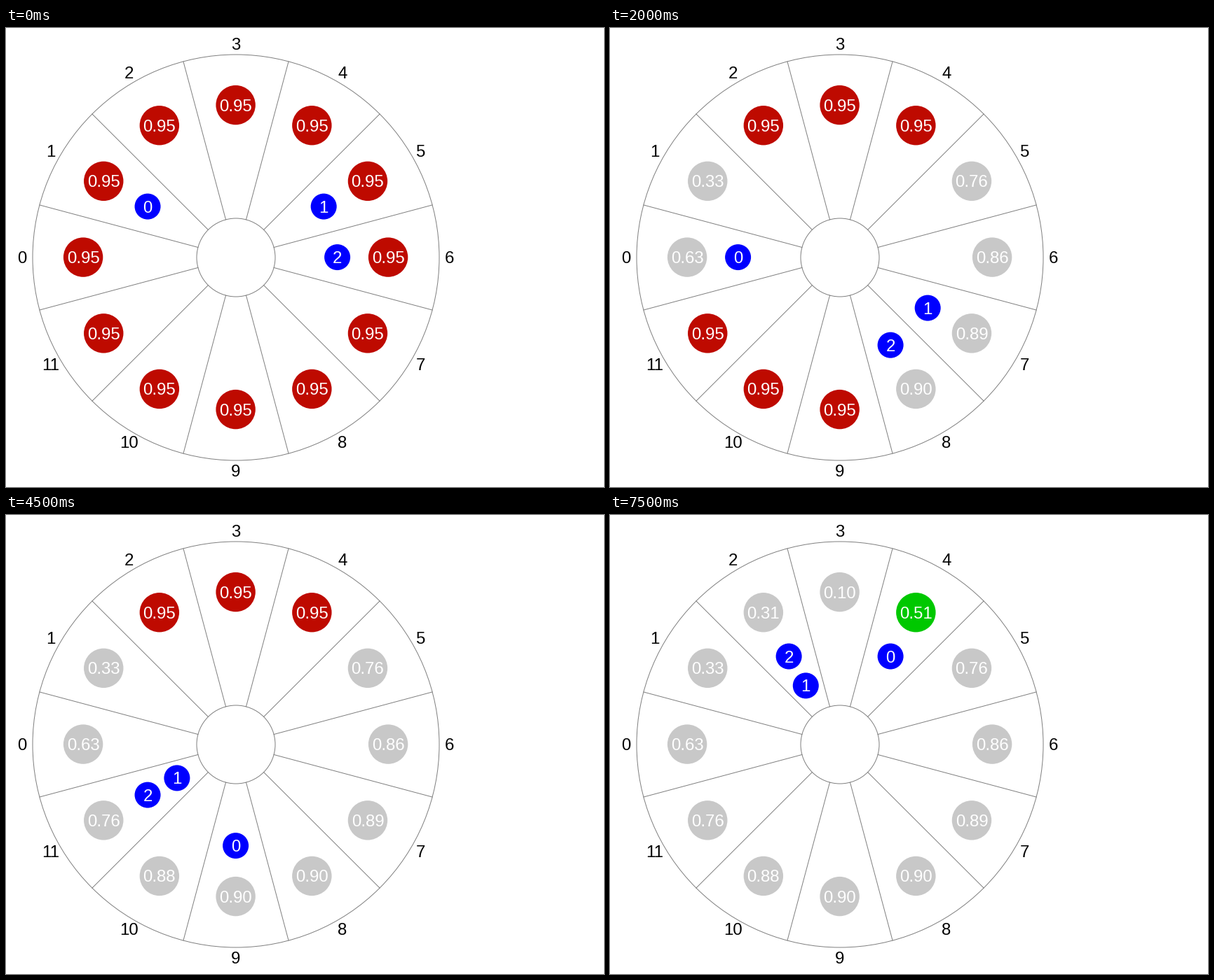
Recreate the animation shown at these times as a matplotlib script. Size 853 px wide and 656 px high, loop 8 s.

```python
import math
import matplotlib.pyplot as plt
from matplotlib.animation import FuncAnimation
from matplotlib.patches import Circle

W, H, DPI = 853, 656, 64
PX = 72 / DPI
CENTER = 328
R, HUB = 290, 56
N = 12
STEPS, STEP_MS = 16, 500
RED, GREEN, GRAY, BLUE = "#be0a00", "#00c800", "#c8c8c8", "#0000ff"
UNKNOWN = 0.95
VALUES = [0.63, 0.33, 0.31, 0.10, 0.51, 0.76, 0.86, 0.89, 0.90, 0.90, 0.88, 0.76]

# Each agent: start cell, then legs (departure step, goal cell); cells are unwrapped
AGENTS = [
    (1, [(1, 0), (4, -1), (7, -8)]),
    (5, [(0, 7), (4, 9), (7, 14), (15, 13)]),
    (6, [(1, 8), (4, 9), (6, 10), (8, 15), (14, 14)]),
]


def cell_at(agent, step):
    """Walk one cell per step along every leg that has begun."""
    pos, legs = agent
    for depart, goal in legs:
        walked = min(max(step - depart, 0), abs(goal - pos))
        pos += int(math.copysign(walked, goal - pos))
    return pos % N


def cell_times():
    """Steps at which each cell is first measured and finally settled."""
    found, settled = [STEPS] * N, [STEPS] * N
    for step in reversed(range(STEPS)):
        for agent in AGENTS:
            found[cell_at(agent, step)] = max(step, 1)
    stops = [(d, cell_at(a, d)) for a in AGENTS for d, _ in a[1]]
    for depart, cell in sorted(stops):
        settled[cell] = max(depart, 1)
    return found, settled


FOUND, SETTLED = cell_times()

fig = plt.figure(figsize=(W / DPI, H / DPI), dpi=DPI, facecolor="white")
ax = fig.add_axes([0, 0, 1, 1])
ax.set_xlim(0, W)
ax.set_ylim(H, 0)
ax.axis("off")


def polar(cell, r, c=CENTER - 0.4):
    a = math.pi + cell * 2 * math.pi / N
    return c + r * math.cos(a), c + r * math.sin(a)


class Badge:
    """A disc, if it has a radius, with centred text."""

    def __init__(self, pos, text, color, r=0, fill=None, z=2):
        self.dot = Circle(pos, r, fc=fill or "none", ec="none", lw=0, zorder=z)
        ax.add_patch(self.dot)
        self.text = ax.text(0, 0, text, color=color, fontsize=24 * PX,
                            family="Liberation Sans", ha="center",
                            va="baseline", zorder=z + 0.5)
        self.move(pos)

    def move(self, pos):
        self.dot.set_center(pos)
        self.text.set_position((pos[0], pos[1] + 8.5))


line = dict(color="#808080", lw=PX)
for r in (R, HUB):
    ax.add_patch(Circle((CENTER, CENTER), r, fill=False, **line))
for k in range(N):
    ends = [polar(k + 0.5, r, CENTER) for r in (HUB, R)]
    ax.plot(*zip(*ends), **line)
    Badge(polar(k, 305), str(k), "black")

nodes = [Badge(polar(k, 0.75 * R), "", "white", 28.2, RED) for k in range(N)]
robots = [Badge(polar(0, R / 2), str(i), "white", 18.5, BLUE, 4 + i)
          for i in range(len(AGENTS))]


def update(step):
    for node, value, found, settled in zip(nodes, VALUES, FOUND, SETTLED):
        known = step >= found
        node.dot.set_facecolor(GRAY if step >= settled else GREEN if known else RED)
        node.text.set_text(f"{value if known else UNKNOWN:.2f}")
    here = [cell_at(agent, step) for agent in AGENTS]
    for i, robot in enumerate(robots):
        # In a shared cell the highest id keeps the outer slot
        shared = here[i] in here[i + 1:]
        robot.move(polar(here[i], R / (3 if shared else 2)))
    return []


anim = FuncAnimation(fig, update, frames=STEPS, init_func=lambda: update(0),
                     interval=STEP_MS, repeat=True, repeat_delay=0, blit=False)
plt.show()
```
